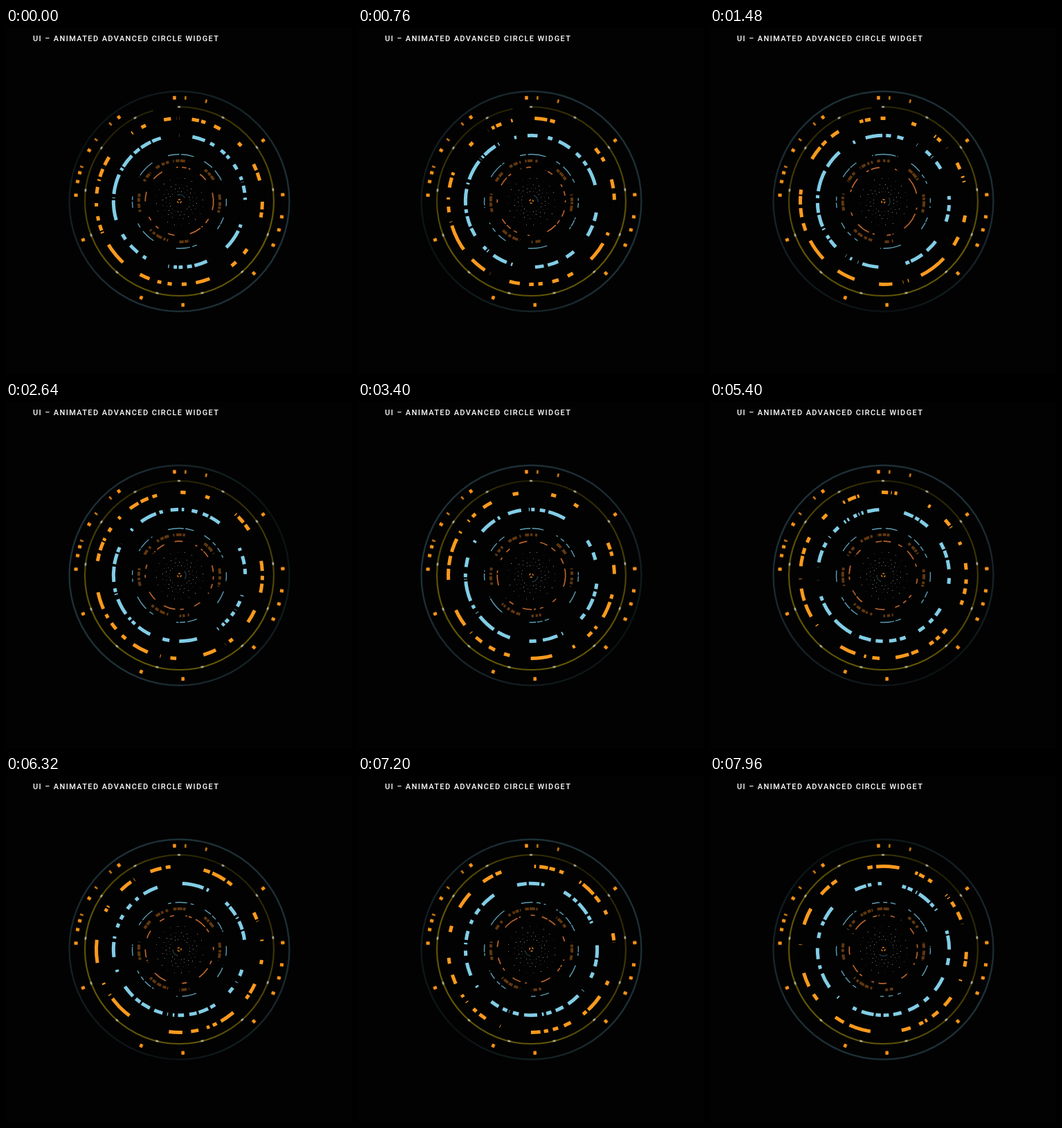
An HTML page with a canvas for the animation above (8000 ms loop, 500 by 500 pixels).

```html
<!DOCTYPE html>
<html lang="en">
<head>
<meta charset="utf-8">
<title>Circle widget</title>
<style>
html, body { margin: 0; width: 100%; height: 100%; overflow: hidden; background: #020202; }
canvas { position: absolute; left: 0; top: 0; }
h1 { position: absolute; left: 39px; top: 9px; margin: 0; color: #fff; white-space: nowrap;
  font: 500 11px/13px Roboto, sans-serif; letter-spacing: 1.38px; }
</style>
</head>
<body>
<canvas id="stage" width="500" height="500"></canvas>
<h1>UI – ANIMATED ADVANCED CIRCLE WIDGET</h1>
<script>
const ctx = document.getElementById('stage').getContext('2d');
const LOOP = 8000, STEP = 40, C = 250.5, BG = '#020202';
const SPIN = .0171; // degrees per ms
const ORANGE = '#fb9a1e';
const rad = deg => (deg - 90) * Math.PI / 180;

// Time, darkest angle of the rim, direction of the core arc.
const turns = [
  [0, 300, 20], [1480, 175, 95], [2640, 60, 88], [4200, 185, 188],
  [5400, 145, 236], [7200, 220, 224], [7960, 325, 180]
];
const brightMarks = [-2.7, 54, 86.3, 98.6, 106, 115, 134, 178, 201.6, 248.2, 273.4, 281, 286, 299.5, 324.3];
const dimMarks = [3.4, 15, 289.5, 306.5, 318.3];
// Centre and half width of the fixed windows.
const thinWindows = [[2, 16], [50, 18], [92, 6], [118, 8], [171, 13], [228, 15], [269, 7], [313, 12]];
const brownWindows = [[0, 9], [48, 10], [93, 13], [173, 7], [211, 15], [268, 13], [307, 8], [335, 10]];

function seeded(seed) {
  let s = seed;
  return () => {
    s = (s * 16807) % 2147483647;
    return s / 2147483647;
  };
}

// Random dashes and gaps that fill one turn, mostly near the short end.
function pattern(seed, [dashMin, dashMax], [gapMin, gapMax]) {
  const next = seeded(seed * 7919);
  const pick = (lo, hi) => lo + (hi - lo) * next() ** 1.5;
  const list = [];
  for (let a = 0; a < 355;) {
    const end = Math.min(358, a + pick(dashMin, dashMax));
    list.push([a, end]);
    a = end + pick(gapMin, gapMax);
  }
  return list;
}

// Each dashed ring is seen through a mask that turns the other way.
const rings = [
  { r: 120, width: 5, color: ORANGE, speed: SPIN,
    dashes: pattern(11, [3, 22], [1, 14]), mask: pattern(23, [2, 26], [3, 24]) },
  { r: 95.2, width: 5, color: '#82cde6', speed: SPIN,
    dashes: pattern(37, [3, 20], [1, 6]), mask: pattern(41, [1.5, 22], [4, 30]) },
  { r: 49.3, width: 1.7, color: '#b9642d', speed: SPIN,
    dashes: pattern(53, [6, 45], [2, 12]), mask: pattern(67, [3, 25], [6, 40]) },
  { r: 68, width: 1.4, color: '#5c9db3', speed: SPIN / 2,
    windows: thinWindows, mask: pattern(71, [1, 6], [5, 26]) },
  { r: 58.7, width: 4, color: '#5f370f', speed: SPIN / 2,
    windows: brownWindows, mask: pattern(83, [1, 4], [3, 9]) }
];

function arc(r, from, to, width, color) {
  ctx.beginPath();
  ctx.arc(C, C, r, rad(from), rad(to));
  ctx.lineWidth = width;
  ctx.strokeStyle = color;
  ctx.stroke();
}

const spot = (r, mid, half, width, color) => arc(r, mid - half, mid + half, width, color);

function dashedRing({ r, width, color, speed, dashes, windows, mask }, t) {
  const turn = t * speed;
  if (windows) windows.forEach(([mid, half]) => spot(r, mid, half, width, color));
  else dashes.forEach(([from, to]) => arc(r, from + turn, to + turn, width, color));
  mask.forEach(([from, to]) => arc(r, from - turn, to - turn, width + 2, BG));
}

// Ring whose brightness falls off around one angle.
function shadedRing(r, width, dark, rgb, end) {
  const shade = ctx.createConicGradient(rad(dark), C, C);
  const tone = k => `rgb(${rgb.map(v => Math.round(v * k))})`;
  shade.addColorStop(0, tone(.35));
  shade.addColorStop(.12, tone(.48));
  shade.addColorStop(.4, tone(1));
  shade.addColorStop(.75, tone(.95));
  shade.addColorStop(1, tone(.35));
  arc(r, 0, end, width, shade);
}

function mark(angle, half, alpha) {
  ctx.globalAlpha = alpha;
  spot(149.7, angle, half, 5, '#d97f10');
  spot(149.7, angle, half / 2, 5, ORANGE);
  ctx.globalAlpha = 1;
}

function dots(t) {
  [15, 20, 25, 34].forEach((r, row) => {
    for (let i = 0; i < 20; i++) {
      const a = rad(i * 18 + row * 7 - 8);
      const glow = Math.sin(t / 420 + i * 1.9 + row * 2.3);
      ctx.fillStyle = `rgba(205,220,200,${.42 + .28 * glow})`;
      ctx.fillRect(Math.round(C + r * Math.cos(a)), Math.round(C + r * Math.sin(a)), 1, 1);
    }
  });
}

// Angle from the key points, going the shorter way round.
function turnAt(t, column) {
  const n = Math.max(1, turns.findIndex(p => p[0] >= t));
  const a = turns[n - 1], b = turns[n];
  const delta = (b[column] - a[column] + 540) % 360 - 180;
  return a[column] + delta * (t - a[0]) / (b[0] - a[0]);
}

function draw(t) {
  ctx.fillStyle = BG;
  ctx.fillRect(0, 0, 500, 500);

  shadedRing(159, 2.4, turnAt(t, 1), [29, 48, 55], 360);
  shadedRing(136.5, 2.2, 320 + t * .01, [98, 86, 6], Math.min(360, 344 + t * .006));

  for (let i = 0; i < 13; i++) {
    const angle = i * 360 / 13 - .2;
    spot(136.5, angle, 1, 3, 'rgba(165,165,150,.55)');
    spot(136.5, angle, .5, 2, 'rgba(225,225,215,.6)');
  }
  brightMarks.forEach(angle => mark(angle, .95, .95));
  dimMarks.forEach(angle => mark(angle, .6, .6));

  rings.forEach(ring => dashedRing(ring, t));
  dots(t);

  spot(9.5, turnAt(t, 2), 38, 1.8, '#1b3036');
  for (let i = 0; i < 3; i++) spot(2.6, i * 120 + t * .09, 35, 1.5, '#d9801f');
}

const start = performance.now();
function frame(now) {
  const t = Math.floor((Math.max(0, now - start) % LOOP) / STEP) * STEP;
  draw(t < 80 ? 0 : t);
  requestAnimationFrame(frame);
}
draw(0);
requestAnimationFrame(frame);
</script>
</body>
</html>
```
